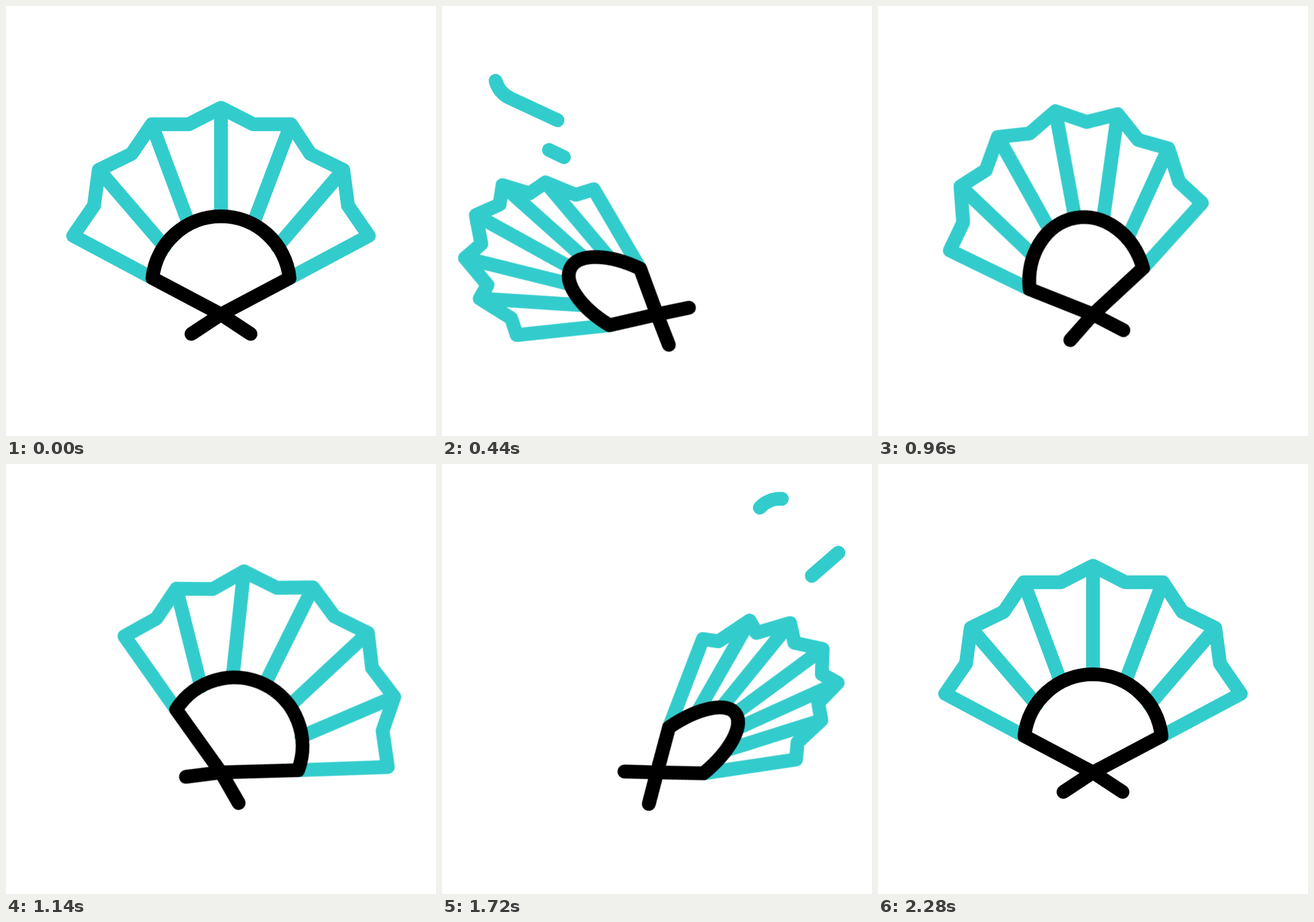
Recreate the animation shown at these times as an HTML page without scripts. Size 640 by 640 pixels, loop 2400 ms.

```html
<!DOCTYPE html>
<html lang="en">
<head>
<meta charset="utf-8">
<title>Waving fan</title>
<style>
  @property --head { syntax: "<number>"; inherits: false; initial-value: 0; }
  @property --tail { syntax: "<number>"; inherits: false; initial-value: 0; }

  html, body { margin: 0; width: 100%; height: 100%; overflow: hidden; background: #fff; }
  svg {
    --ease: cubic-bezier(.3333, 0, .6667, 1);
    display: block;
    width: 100%;
    height: 100%;
  }
  path {
    fill: none;
    stroke: #33cccc;
    stroke-width: 20.6;
    stroke-linecap: round;
    stroke-linejoin: round;
  }

  /* Fan: swings about its pivot while it folds and unfolds */
  .swing { animation: swing 2400ms var(--ease) infinite; }
  .fold { d: var(--open); animation: fold 2400ms var(--ease) infinite; }
  .leaf {
    --open: path("M-102 -54L-220 -117L-189 -162L-182 -215L-133 -239L-103 -283L-48 -283L0 -307.5L48 -283L104 -283L133 -239L182 -215L189 -162L220 -117L102 -54M-182 -215L-84 -101M-103 -283L-48 -135M0 -307.5L0 -146M104 -283L48 -135M182 -215L84 -101");
    --shut: path("M-42.7 -54.5L-117.5 -174L-100.7 -190.5L-97.6 -246L-76.8 -243L-58.5 -292L-31 -279.5L1.5 -307.5L30.6 -284L55.2 -295L61.6 -254L85 -242L90 -194L109 -177L42.7 -54.5M-97.6 -246L-36 -103M-58.5 -292L-20 -137M1.5 -307.5L0 -146M55.2 -295L20 -137M85 -242L36 -103");
  }
  .handle {
    --open: path("M44 29L0 0L-102 -54C-96.6 -106 -52.5 -146 0 -146C52.5 -146 96.6 -106 102 -54L0 0L-44 29");
    --shut: path("M30.2 38L0 0L-42.7 -54.5C-40.4 -106 -22 -146 0 -146C22 -146 40.4 -106 42.7 -54.5L0 0L-30.2 38");
    stroke: #000;
  }
  @keyframes swing {
    0%, 95%, 100% { transform: rotate(0deg); }
    22.2% { transform: rotate(-66.8deg); }
    62.1% { transform: rotate(66.8deg); }
  }
  @keyframes fold {
    0%, 49.2%, 95%, 100% { d: var(--open); }
    22.5%, 71.25% { d: var(--shut); }
  }

  /* Breeze: each stroke grows from its start, then drains towards its end */
  .breeze path {
    stroke-dasharray: calc(var(--head) - var(--tail)) 3;
    stroke-dashoffset: calc(0 - var(--tail));
    visibility: hidden;
    animation-duration: 2400ms;
    animation-timing-function: var(--ease), var(--ease), step-end;
    animation-iteration-count: infinite;
  }
  .breeze .curl { animation-name: curl-head, curl-tail, curl-show; }
  .breeze .dash { animation-name: dash-head, dash-tail, dash-show; }
  .breeze.right path { animation-delay: -1460ms; }

  @keyframes curl-head { 0%, 10% { --head: 0; } 25.83%, 100% { --head: 1; } }
  @keyframes curl-tail { 0%, 21.1% { --tail: 0; } 37%, 100% { --tail: 1; } }
  @keyframes curl-show { 0%, 36.9% { visibility: hidden; } 10.2% { visibility: visible; } }
  @keyframes dash-head { 0%, 15.2% { --head: 0; } 27.5%, 100% { --head: 1; } }
  @keyframes dash-tail { 0%, 25% { --tail: 0; } 37.5%, 100% { --tail: 1; } }
  @keyframes dash-show { 0%, 37.4% { visibility: hidden; } 15.4% { visibility: visible; } }
</style>
</head>
<body>
<svg viewBox="0 0 640 640">
  <g class="breeze left">
    <path class="curl" pathLength="1" d="M172 170L101 137A41 41 0 0 1 137.5 63.5"/>
    <path class="dash" pathLength="1" d="M181.5 225L47 160"/>
  </g>
  <g class="breeze right">
    <path class="curl" pathLength="1" d="M487 161L528.5 125A41 41 0 1 0 473 65"/>
    <path class="dash" pathLength="1" d="M476 231L590 132"/>
  </g>
  <g transform="translate(320 459)">
    <g class="swing">
      <path class="fold leaf"/>
      <path class="fold handle"/>
    </g>
  </g>
</svg>
</body>
</html>
```
